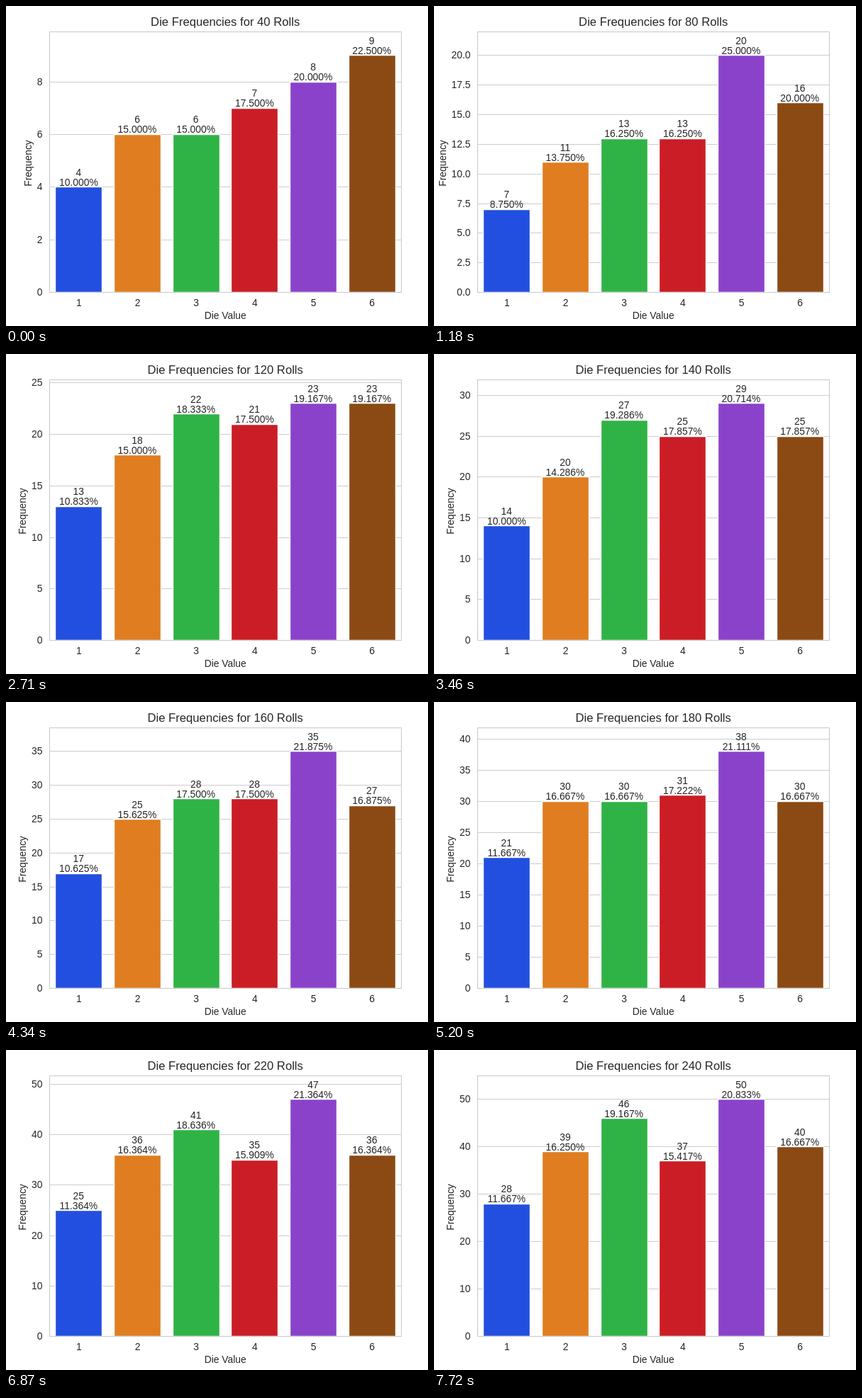
Recreate the animation shown at these times as an HTML page. Size 595 px wide and 452 px high, loop 8000 ms.

```html
<!DOCTYPE html>
<html lang="en">
<head>
<meta charset="utf-8">
<title>Die Frequencies</title>
<style>
  html, body { margin: 0; width: 100%; height: 100%; overflow: hidden; background: #fff; }
  svg { display: block; }
  text { font: 13.89px "Liberation Sans", Arial, sans-serif; fill: #262626; text-anchor: middle; }
  .title { font-size: 16.67px; }
  .tick { text-anchor: end; }
  .grid { stroke: #ccc; stroke-width: 1.11; }
  .bar { stroke: #fff; stroke-width: 1.39; }
  .frame { fill: none; stroke: #ccc; stroke-width: 1.11; }
</style>
</head>
<body>
<svg id="chart" width="595" height="452" viewBox="0 0 595 452"></svg>
<script>
const LOOP = 8000;
const LEFT = 61.5, RIGHT = 557.5, TOP = 36.5, BOTTOM = 404.5;
const SLOT = (RIGHT - LEFT) / 6;
const COLORS = ["#224fdf", "#df7d20", "#30b346", "#cb1d25", "#8a42cb", "#8b4a14"];
const STEPS = [1, 2, 2.5, 5, 10];

// Start time in ms, then how often each face has come up.
const STATES = [
  [0, [4, 6, 6, 7, 8, 9]],
  [200, [5, 9, 9, 10, 15, 12]],
  [1180, [7, 11, 13, 13, 20, 16]],
  [1950, [11, 15, 17, 15, 21, 21]],
  [2710, [13, 18, 22, 21, 23, 23]],
  [3460, [14, 20, 27, 25, 29, 25]],
  [4340, [17, 25, 28, 28, 35, 27]],
  [5200, [21, 30, 30, 31, 38, 30]],
  [5970, [23, 33, 36, 33, 42, 33]],
  [6870, [25, 36, 41, 35, 47, 36]],
  [7720, [28, 39, 46, 37, 50, 40]]
];

const chart = document.getElementById("chart");
const snap = v => Math.floor(v) + 0.5;
const label = (x, y, str, attrs = "") => `<text x="${x}" y="${y}" ${attrs}>${str}</text>`;

function draw(counts) {
  const rolls = counts.reduce((a, b) => a + b);
  const yMax = Math.max(...counts) * 1.1;
  const step = STEPS.find(s => yMax / s <= 9);
  const digits = step % 1 ? 1 : 0;
  const yOf = v => BOTTOM - v / yMax * (BOTTOM - TOP);
  let grid = "", ticks = "", bars = "", notes = "";

  for (let v = 0; v <= yMax; v += step) {
    const y = snap(yOf(v));
    grid += `<path class="grid" d="M${LEFT} ${y}H${RIGHT}"/>`;
    ticks += label(51.5, Math.round(yOf(v) + 4.5), v.toFixed(digits), 'class="tick"');
  }

  counts.forEach((n, i) => {
    const mid = LEFT + SLOT * (i + 0.5);
    const x0 = snap(mid - SLOT * 0.4), x1 = snap(mid + SLOT * 0.4);
    const top = yOf(n), base = Math.round(top - 2);
    bars += `<path class="bar" fill="${COLORS[i]}" d="M${x0} ${BOTTOM}V${snap(top)}H${x1}V${BOTTOM}Z"/>`;
    notes += label(mid - 0.5, base - 14, n)
      + label(mid - 0.5, base, (n / rolls * 100).toFixed(3) + "%")
      + label(mid, 424, i + 1);
  });

  const tickWidth = yMax < 10 ? 7.72 : digits ? 27.03 : 15.45;
  const nameX = Math.ceil(43.4 - tickWidth);
  chart.innerHTML = grid + bars
    + `<rect class="frame" x="${LEFT}" y="${TOP}" width="${RIGHT - LEFT}" height="${BOTTOM - TOP}"/>`
    + ticks + notes
    + label(309.2, 28, `Die Frequencies for ${rolls} Rolls`, 'class="title"')
    + label(309.2, 441.5, "Die Value")
    + label(0, 0, "Frequency", `transform="translate(${nameX} 222) rotate(-90)"`);
}

let shown;
const start = performance.now();

function tick(now) {
  const t = Math.max(0, now - start) % LOOP;
  const state = STATES.filter(s => s[0] <= t).pop();
  if (state !== shown) draw((shown = state)[1]);
  requestAnimationFrame(tick);
}
tick(start);
</script>
</body>
</html>
```
